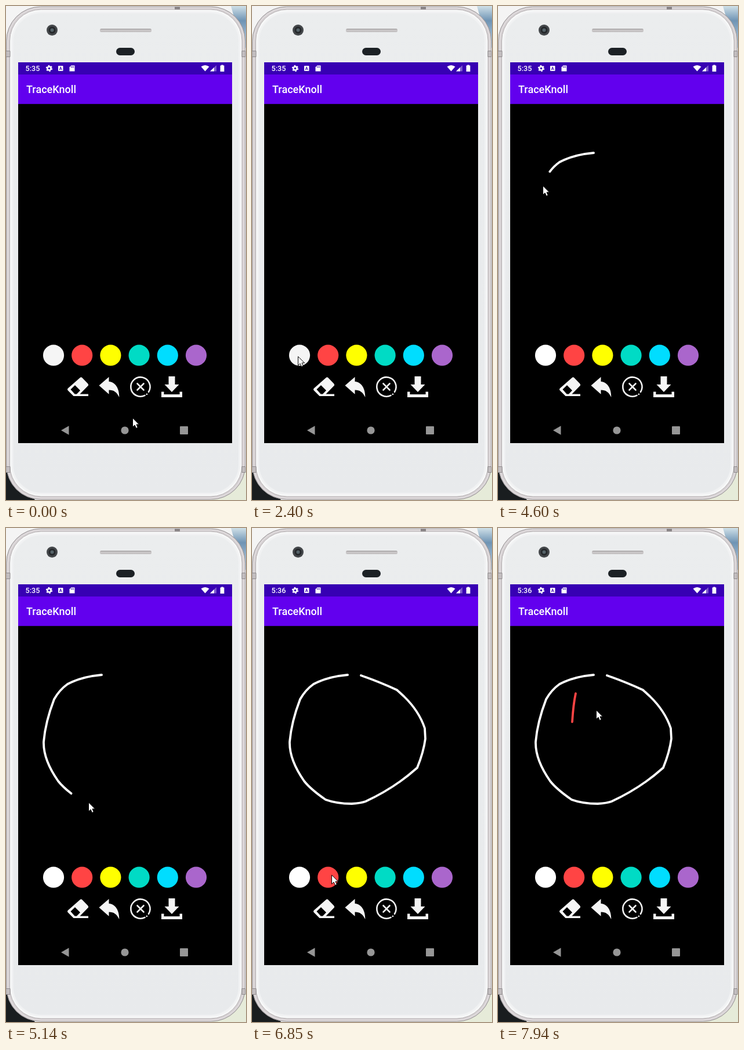
These frames come from a looping animation (414 px wide and 851 px high, 8 s). An HTML page:

```html
<!DOCTYPE html>
<html lang="en">
<head>
<meta charset="utf-8">
<title>Drawing app</title>
<style>
html, body { margin: 0; width: 100%; height: 100%; overflow: hidden; background: #f4f4f4; }
svg { display: block; width: 414px; height: 851px; }
text { font-family: Roboto, sans-serif; font-weight: 500; fill: #fff; }
</style>
</head>
<body>
<svg viewBox="0 0 414 851">
  <defs>
    <linearGradient id="face" x2="0" y2="1">
      <stop offset="0" stop-color="#ebedee"/>
      <stop offset="1" stop-color="#e8eaec"/>
    </linearGradient>
    <linearGradient id="sky" x2="0" y2="1">
      <stop offset="0" stop-color="#cfe0e8"/>
      <stop offset=".35" stop-color="#6f94b4"/>
      <stop offset="1" stop-color="#bdd3e5"/>
    </linearGradient>
    <linearGradient id="speaker" x2="0" y2="1">
      <stop offset="0" stop-color="#a19e9f"/>
      <stop offset=".5" stop-color="#cfcccd"/>
      <stop offset="1" stop-color="#bcb9ba"/>
    </linearGradient>
  </defs>

  <!-- Desktop behind the phone -->
  <rect width="414" height="851" fill="#f4f4f4"/>
  <path d="M388 0H414V72H408Z" fill="url(#sky)"/>
  <path d="M0 795H10L50 851H0Z" fill="#191d1f"/>
  <path d="M414 795H405L355 851H414Z" fill="#e6ebd9"/>

  <!-- Phone body -->
  <rect x=".7" y="1.2" width="412" height="848.8" rx="59" fill="#d5d0d2" stroke="#969294"/>
  <rect x="3" y="3.2" width="407.6" height="844.6" rx="57" fill="none" stroke="#e9e5e7"/>
  <rect x="6.500" y="6" width="400.6" height="839" rx="54" fill="#f7f8f8" stroke="#b5b0b2"/>
  <rect x="11" y="11" width="391.6" height="829" rx="50" fill="url(#face)" stroke="#f1f2f3" stroke-width="3"/>
  <g fill="#c3bec0" stroke="#8e8a8c">
    <path d="M0 77.500H7V87.500H0ZM407 77.500H413V87.500H407Z"/>
    <path d="M0 793.500H7V803.500H0ZM407 793.500H413V803.500H407Z"/>
  </g>
  <rect x="291" y="1" width="9" height="5" fill="#8b8688"/>
  <circle cx="79.500" cy="41.500" r="9.500" fill="#44474a"/>
  <circle cx="79.500" cy="41.500" r="6" fill="#25282b"/>
  <circle cx="79.500" cy="41.500" r="3" fill="#566369"/>
  <rect x="162" y="39" width="89" height="6" rx="2.500" fill="url(#speaker)"/>
  <rect x="190" y="72" width="32" height="13" rx="6.500" fill="#1c2125"/>

  <!-- Screen -->
  <rect x="21" y="97" width="369" height="656"/>
  <rect x="21" y="97" width="369" height="21" fill="#3700b3"/>
  <rect x="21" y="118" width="369" height="50.800" fill="#6200ee"/>
  <text id="clock" x="33.500" y="112" font-size="12.600"></text>
  <text x="35" y="150" font-size="18">TraceKnoll</text>

  <!-- Status icons -->
  <g fill="#fff">
    <circle cx="74.500" cy="107.500" r="3.100" fill="none" stroke="#fff" stroke-width="2.600"/>
    <circle cx="74.500" cy="107.500" r="4.800" fill="none" stroke="#fff" stroke-width="1.800" stroke-dasharray="2.500 2.526"/>
    <rect x="90" y="103" width="8.500" height="9" rx="1"/>
    <path d="M92.200 110.300L94.250 104.800L96.300 110.300M92.900 108.700H95.600" fill="none" stroke="#3700b3"/>
    <path d="M112.500 102.500H118.500V112.500H109.500V105.500Z"/>
    <path d="M112.500 104V106.200M114.500 104V106.200M116.500 104V106.200" stroke="#3700b3"/>
    <path d="M336.500 104.500Q343.500 99.500 350.500 104.500L343.500 112.500Z"/>
    <path d="M352 112.500L363 102V112.500Z" fill-opacity=".35"/>
    <path d="M352 112.500L359 105.800V112.500Z"/>
    <path d="M371.300 101.500H374.700V102.600H376.400V113H369.600V102.600H371.300Z"/>
  </g>

  <g id="palette"></g>

  <!-- Tools -->
  <g fill="#f5f5f5">
    <path d="M127.500 640.500Q129.500 638.700 131.500 640.500L141.200 650.500Q143 652.500 141.200 654.500L127.500 668.500H142V672H116.500L107 662.500Q105 660.500 107 658.500Z"/>
    <path d="M111.500 660.500L119 653.300L128 662.300L122 668.500H118.600Z" fill="#000"/>
    <path d="M160.500 653.800L177.500 639V647C189 648 195.500 659 195.300 674C191 665 186 661.500 177.500 661.500V668.800Z"/>
    <g fill="none" stroke="#f5f5f5" stroke-width="2.600" stroke-linecap="round">
      <path d="M239.500 670.800A16.600 16.600 0 1 1 246 664.800M242.800 668.700H243"/>
      <path d="M226.500 650.500L237.500 661.500M237.500 650.500L226.500 661.500"/>
    </g>
    <path d="M280.500 638H291.500V652H298.500L286 665L273.500 652H280.500Z"/>
    <path d="M268 664.500H272.500V669H299.500V664.500H304V674H268Z"/>
  </g>
  <g fill="#969696">
    <path d="M95 731L108.500 723.300V738.700Z"/>
    <circle cx="205" cy="731" r="6.600"/>
    <rect x="300" y="724" width="14" height="14" rx="1"/>
  </g>

  <g fill="none" stroke-width="3.800" stroke-linecap="round" stroke-linejoin="round">
    <path id="ring" stroke="#fff" d="M165 253Q130 256 106 269Q92 279 83 295Q68 334 65 368Q64 399 90 436Q101 450 127 468Q146 475 172 475Q188 474 196 471Q246 448 285 413Q296 386 299 363L298 345Q288 315 262 290L250 279Q222 266 188 254"/>
    <path id="tick" stroke="#ff4444" d="M134 285Q130 303 128 334"/>
  </g>
  <path id="cursor" d="M.5 .8V16.300L4 12.900L6.500 18.400L9.300 17.200L7 11.900H11.600Z" fill="#fff" stroke="#000"/>
</svg>

<script>
const LOOP = 8000;
const STEP = 90;  // screen refresh
const LAG = 85;   // ink trails the pointer
const $ = id => document.getElementById(id);

$("palette").innerHTML = ["#f5f5f5", "#ff4444", "#ffff00", "#00dbc5", "#00ddff", "#aa66cc"]
  .map((color, i) => `<circle cx="${82 + i * 49.2}" cy="601.7" r="18.1" fill="${color}"/>`).join("");
const whiteSwatch = $("palette").firstChild;

const smooth = u => u * u * (3 - 2 * u);
const speedUp = u => u ** 1.3;
const linear = u => u;

function leg(start, end, path, ease = smooth) {
  if (typeof path === "string") {
    const d = path;
    path = document.createElementNS("http://www.w3.org/2000/svg", "path");
    path.setAttribute("d", d);
  }
  const length = path.getTotalLength();
  const distance = t => length * ease(Math.min(1, Math.max(0, (t - start) / (end - start))));
  return { start, path, distance };
}

const drawRing = leg(4150, 5980, $("ring"), speedUp);
const drawTick = leg(7600, 7830, $("tick"), linear);
const legs = [
  leg(0, 370, "M219 710L124 704"),
  leg(800, 1000, "M124 704L97 693"),
  leg(1500, 2260, "M143 836Q35 660 79 603"),
  leg(3200, 3880, "M79 603Q130 350 165 254"),
  drawRing,
  leg(6150, 6670, "M187 253Q130 400 137 597"),
  leg(6850, 7590, "M137 597Q170 430 133 286"),
  drawTick,
  leg(7830, 7930, "M127 334L169 313", linear)
];

function ink({ path, distance }, t) {
  const drawn = distance(t - LAG);
  path.style.display = drawn > 0 ? "" : "none";
  path.setAttribute("stroke-dasharray", `${drawn} 9999`);
}

function render(time) {
  const t = Math.floor((time % LOOP + 10) / STEP) * STEP + 10;
  const { path, distance } = legs.filter(l => l.start <= t).pop();
  const tip = path.getPointAtLength(distance(t));
  $("cursor").setAttribute("transform", `translate(${Math.floor(tip.x)} ${Math.floor(tip.y)})`);
  $("cursor").style.display = t >= 1090 && t < 1600 ? "none" : "";
  whiteSwatch.setAttribute("fill", t >= 3230 ? "#fff" : "#f5f5f5");
  $("clock").textContent = t < 6300 ? "5:35" : "5:36";
  ink(drawRing, t);
  ink(drawTick, t);
}

const origin = performance.now();
function frame() {
  render(performance.now() - origin);
  requestAnimationFrame(frame);
}
frame();
</script>
</body>
</html>
```
